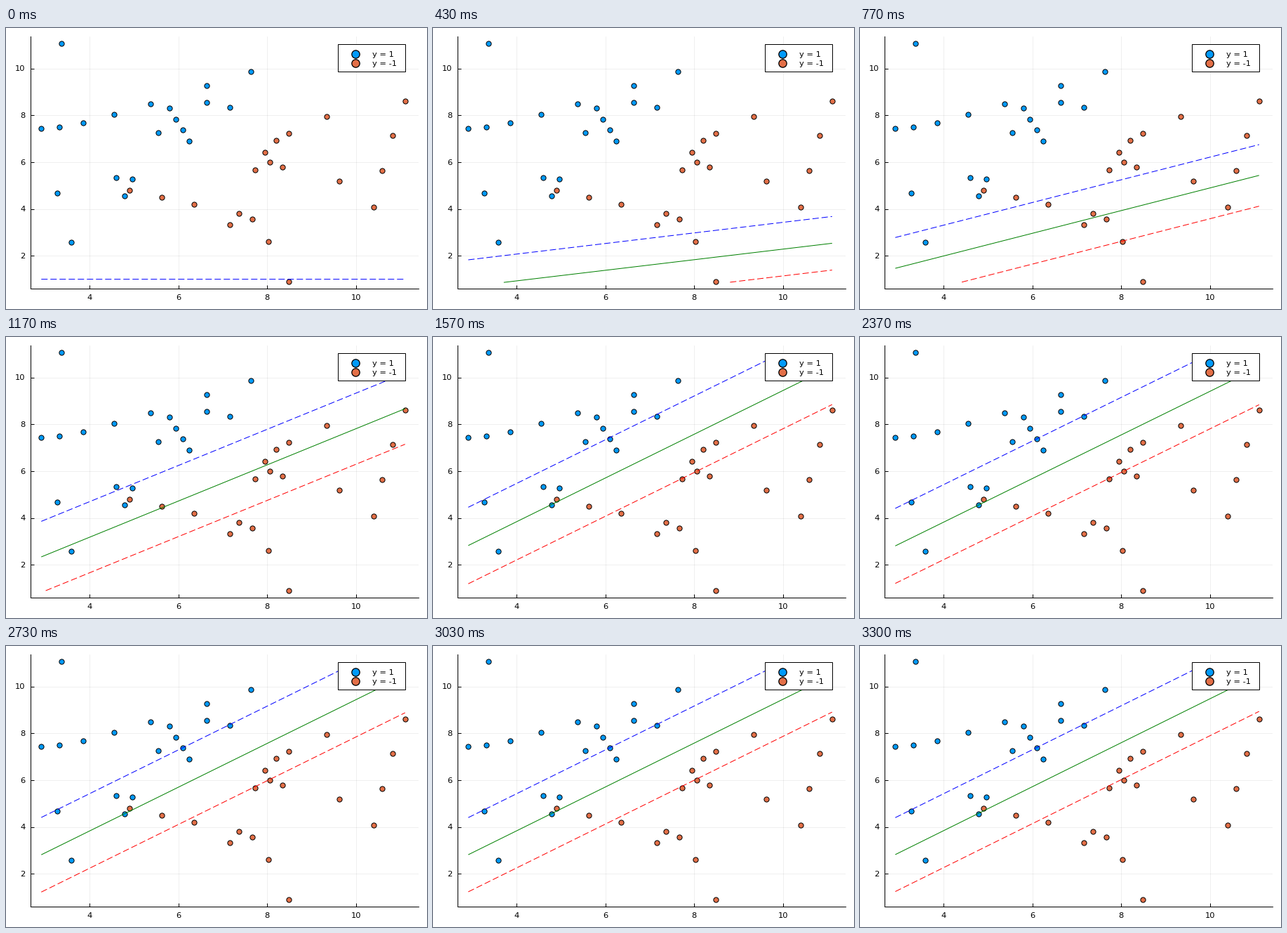
Recreate the animation shown at these times as a matplotlib script. Size 600x400 px, loop 3330 ms.

```python
import numpy as np
import matplotlib.pyplot as plt
from matplotlib.animation import FuncAnimation
from matplotlib.patches import Rectangle

W, H, DPI = 600, 400, 100
PX = 72 / DPI  # points per pixel
STEPS = 100
RATE, DECAY = 0.99e-4, 2
BLUE, ORANGE = "#009afa", "#e36f47"

plt.rcParams["font.family"] = "DejaVu Sans"


def px_x(x):
    return 119.2 + (x - 4) * 63.23


def px_y(y):
    return 324.3 - (y - 2) * 33.33


def row(n, start, end):
    return np.linspace(start, end, n)


def arc(n, start, mid, end):
    """n evenly timed points on the parabola through three key points."""
    t = np.linspace(0, 1, n)[:, None]
    return ((1 - t) * (1 - 2 * t) * np.array(start) + 4 * t * (1 - t) * np.array(mid)
            + t * (2 * t - 1) * np.array(end))


# Each class: a few smooth strands plus single points
pos = np.vstack([
    arc(5, (2.90, 7.44), (3.86, 7.69), (5.38, 8.50)),
    row(4, (5.80, 8.31), (6.24, 6.91)),
    arc(3, (4.595, 5.345), (4.78, 4.545), (4.955, 5.285)),
    [(3.36, 11.07), (3.27, 4.69), (3.59, 2.58), (5.54, 7.26),
     (6.635, 9.28), (6.645, 8.54), (7.16, 8.35), (7.64, 9.86)]])
neg = np.vstack([
    row(3, (4.90, 4.80), (6.36, 4.21)),
    arc(5, (8.485, 0.895), (7.66, 3.58), (7.16, 3.32)),
    arc(4, (8.49, 7.23), (8.07, 6.69), (7.73, 5.675)),
    arc(4, (10.40, 4.09), (10.705, 6.39), (11.11, 8.60)),
    [(8.06, 6.00), (8.34, 5.78), (9.35, 7.95), (9.625, 5.185)]])


def train():
    """Subgradient descent on the soft-margin loss; one state per step."""
    pts = np.vstack([pos, neg])
    sign = np.repeat([1, -1], [len(pos), len(neg)])
    w, b = np.array([0.0, 1.0]), 0.0
    states = []
    for _ in range(STEPS):
        states.append((w, b))
        active = sign * (pts @ w + b) < 1
        s = sign[active]
        w, b = w + RATE * (s @ pts[active] - DECAY * w), b + RATE * s.sum()
    return states


states = train()

fig = plt.figure(figsize=(W / DPI, H / DPI), dpi=DPI, facecolor="white")

# Plot area, placed by its pixel edges
LEFT, RIGHT, TOP, BOTTOM = 34.6, 588, 11.6, 370.9
ax = fig.add_axes([LEFT / W, 1 - BOTTOM / H, (RIGHT - LEFT) / W, (BOTTOM - TOP) / H])
ax.set_xlim([4 + (x - px_x(4)) / 63.23 for x in (LEFT, RIGHT)])
ax.set_ylim([2 + (px_y(2) - y) / 33.33 for y in (BOTTOM, TOP)])
ax.set_xticks(range(4, 11, 2))
ax.set_yticks(range(2, 11, 2))
ax.tick_params(direction="in", length=5 * PX, width=PX,
               labelbottom=False, labelleft=False)
ax.set_axisbelow(True)
ax.grid(color="black", alpha=0.1, lw=0.6 * PX)
ax.spines[["top", "right"]].set_visible(False)
ax.spines[["left", "bottom"]].set_linewidth(PX)

# Overlay in pixel coordinates for labels and legend
top = fig.add_axes([0, 0, 1, 1])
top.set_xlim(0, W)
top.set_ylim(H, 0)
top.axis("off")


def label(x, y, text, ha):
    top.text(x, y, text, ha=ha, va="baseline", fontsize=11.5 * PX)


def dots(axes, x, y, color, size, edge):
    axes.plot(x, y, "o", ms=size * PX, mfc=color, mec="black", mew=edge * PX,
              zorder=3, snap=False)


for t in range(2, 11, 2):
    label(27.5, px_y(t) + 3.6, str(t), "right")
    if t > 2:
        label(px_x(t), 386.8, str(t), "center")

top.add_patch(Rectangle((472.8, 22.8), 96.5, 39.2, fc="white", ec="black", lw=PX))
for points, color, name, y in ((pos, BLUE, "y = 1", 36.8), (neg, ORANGE, "y = -1", 49.6)):
    dots(ax, *points.T, color, 7.2, 1)
    dots(top, [497.8], [y], color, 11.3, 1.3)
    label(522, y + 4, name, "left")

# Decision line and its two margins
xs = 2.91 + 0.1 * np.arange(83)
LOW, HIGH = 0.86, 11.0
DASH = (0, (9, 4))
lines = {}
for level, color, style in ((0, "green", "-"), (1, "blue", DASH), (-1, "red", DASH)):
    lines[level], = ax.plot([], [], color=color, ls=style, lw=PX, zorder=4,
                            snap=False, dash_capstyle="butt", solid_capstyle="butt")


def draw(i):
    w, b = states[i]
    for level, line in lines.items():
        ys = (level - b - w[0] * xs) / w[1]
        keep = (ys >= LOW) & (ys <= HIGH)
        line.set_data(xs[keep], ys[keep])
    return list(lines.values())


anim = FuncAnimation(fig, draw, frames=STEPS, interval=33.3, repeat=True, repeat_delay=0)
plt.show()
```
